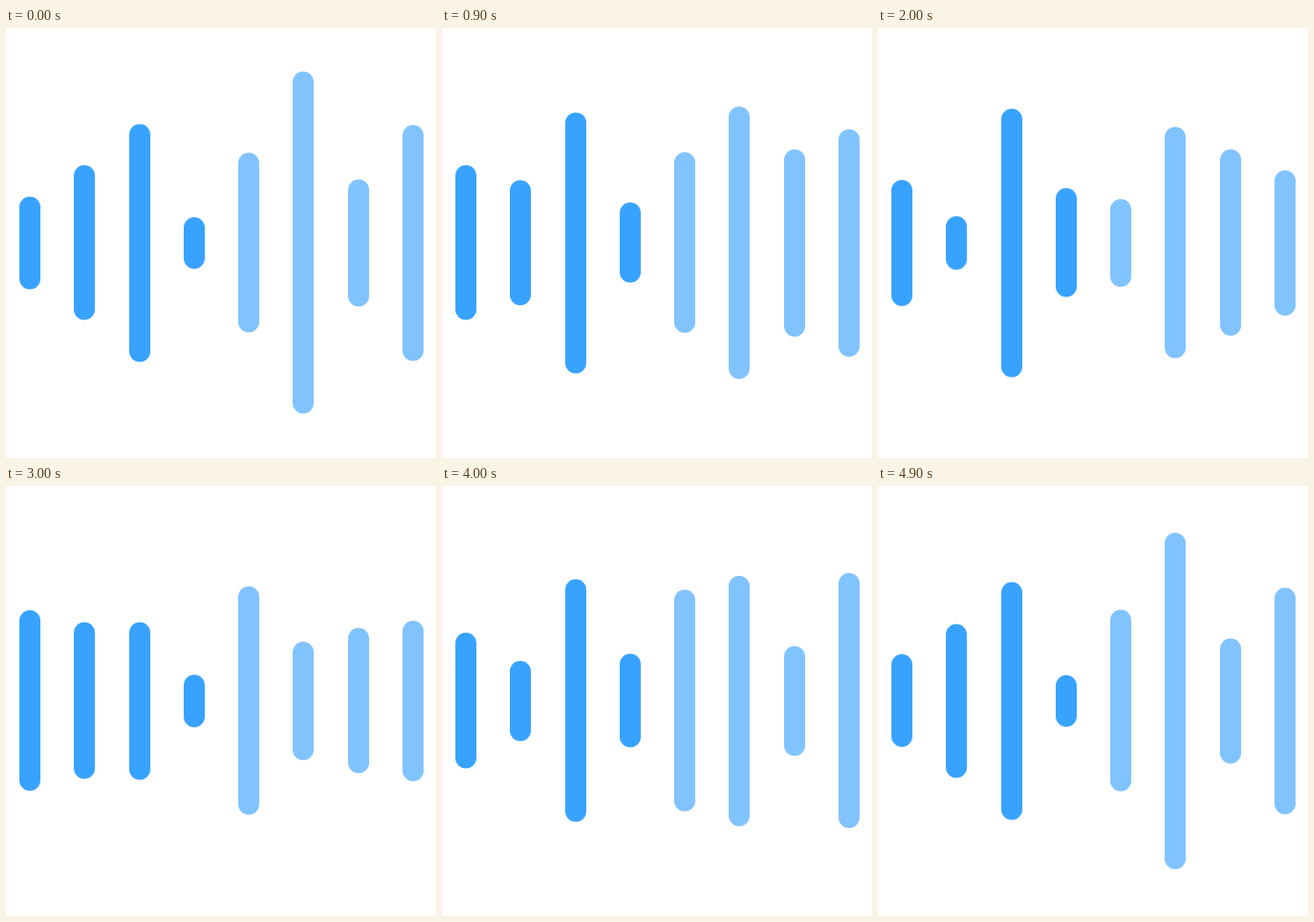
An HTML page without scripts for the animation above (5000 ms loop, 450 px wide and 450 px high).

```html
<!DOCTYPE html>
<html lang="en">
<head>
<meta charset="utf-8">
<title>Sound bars</title>
<style>
html, body {
  margin: 0;
  width: 100%;
  height: 100%;
  overflow: hidden;
  background: #fff;
}
.bar {
  position: absolute;
  left: calc(13.9px + 57.3px * var(--i));
  top: 224.5px;
  width: 22px;
  border-radius: 11px;
  background: #38a3ff;
  transform: translateY(-50%);
  animation: 5s cubic-bezier(.35, 0, .65, 1) infinite;
}
.light { background: #80c3ff; }

.b0 { --i: 0; animation-name: b0; }
.b1 { --i: 1; animation-name: b1; }
.b2 { --i: 2; animation-name: b2; }
.b3 { --i: 3; animation-name: b3; }
.b4 { --i: 4; animation-name: b4; }
.b5 { --i: 5; animation-name: b5; }
.b6 { --i: 6; animation-name: b6; }
.b7 { --i: 7; animation-name: b7; }

@keyframes b0 {
  0%, 100% { height: 97px }
  12% { height: 207px }
  26% { height: 95px }
  40% { height: 132px }
  60% { height: 190px }
  80% { height: 143px }
  98% { height: 98px }
}
@keyframes b1 {
  0%, 100% { height: 163px }
  12% { height: 139px }
  26% { height: 120px }
  40% { height: 56px }
  60% { height: 165px }
  80% { height: 84px }
  98% { height: 161px }
}
@keyframes b2 {
  0%, 100% { height: 249px }
  12% { height: 276px }
  26% { height: 269px }
  40% { height: 281px }
  48% { height: 298px }
  60% { height: 165px }
  80% { height: 255px }
  98% { height: 249px }
}
@keyframes b3 {
  0%, 100% { height: 54px }
  12% { height: 92px }
  26% { height: 74px }
  40% { height: 115px }
  60% { height: 55px }
  80% { height: 99px }
  98% { height: 54px }
}
@keyframes b4 {
  0%, 100% { height: 189px }
  12% { height: 118px }
  26% { height: 301px }
  28% { height: 309px }
  40% { height: 92px }
  60% { height: 240px }
  80% { height: 233px }
  98% { height: 191px }
}
@keyframes b5 {
  0%, 100% { height: 359px }
  12% { height: 355px }
  26% { height: 178px }
  40% { height: 243px }
  60% { height: 124px }
  80% { height: 262px }
  85% { height: 343px }
  90% { height: 353px }
  98% { height: 352px }
}
@keyframes b6 {
  0%, 100% { height: 133px }
  12% { height: 167px }
  26% { height: 241px }
  40% { height: 196px }
  60% { height: 153px }
  80% { height: 115px }
  98% { height: 131px }
}
@keyframes b7 {
  0%, 100% { height: 247px }
  12% { height: 298px }
  26% { height: 146px }
  40% { height: 152px }
  60% { height: 168px }
  71% { height: 320px }
  80% { height: 268px }
  98% { height: 237px }
}
</style>
</head>
<body>
<div class="bar b0"></div>
<div class="bar b1"></div>
<div class="bar b2"></div>
<div class="bar b3"></div>
<div class="bar light b4"></div>
<div class="bar light b5"></div>
<div class="bar light b6"></div>
<div class="bar light b7"></div>
</body>
</html>
```
